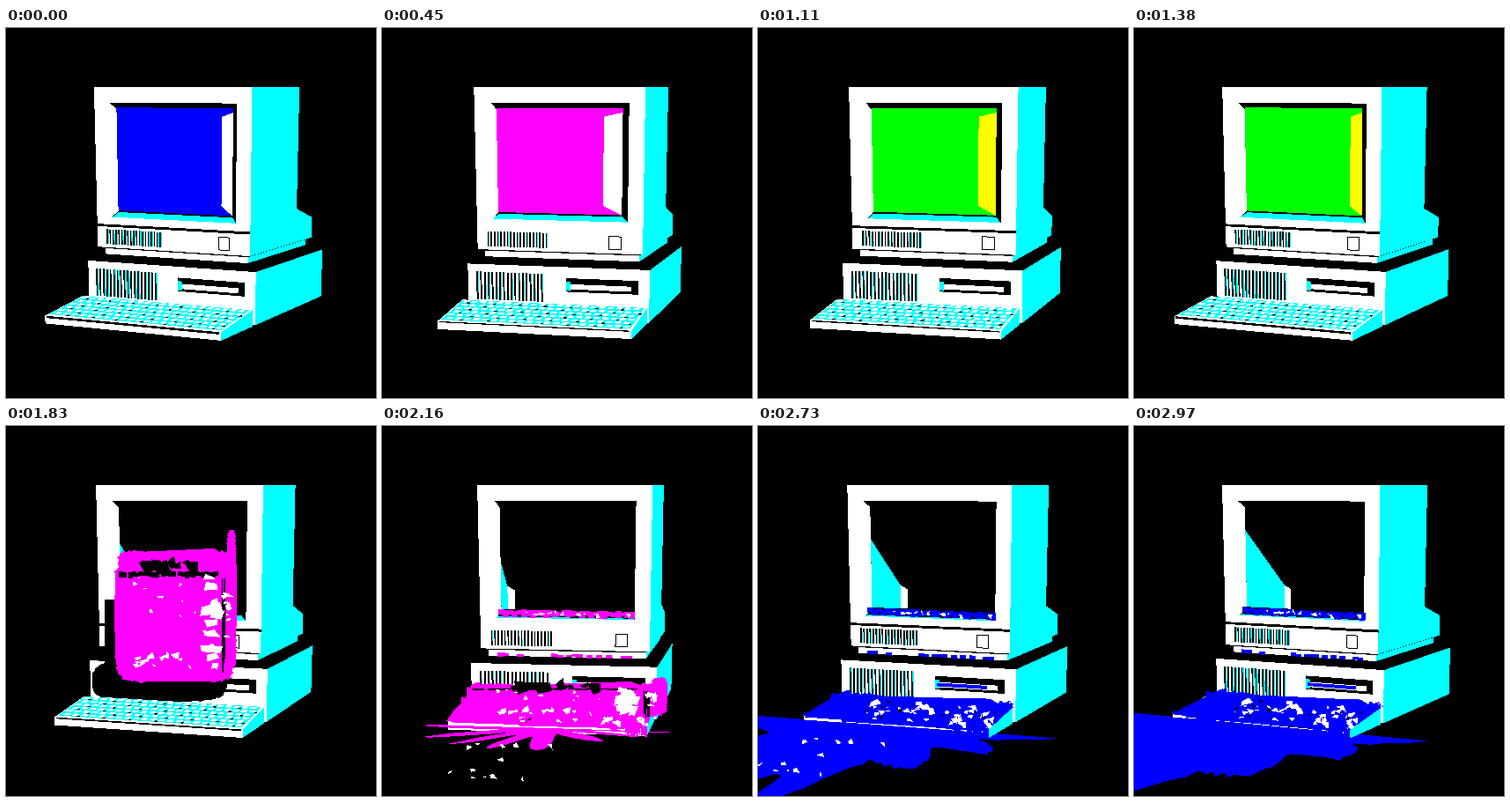
Recreate the animation shown at these times as an HTML page. Size 420 by 420 pixels, loop 3000 ms.

```html
<!DOCTYPE html>
<html lang="en">
<head>
<meta charset="utf-8">
<title>Melting monitor</title>
<style>
html, body { margin: 0; width: 100%; height: 100%; overflow: hidden; background: #000; }
svg { display: block; width: 100vw; height: 100vh; }
</style>
</head>
<body>
<svg id="stage" viewBox="0 0 420 420" shape-rendering="crispEdges"></svg>
<script>
const LOOP = 3000, STEP = 30, SWAY = 1500, MELT = 1500, SPLASH = 2070;
const WHITE = '#fff', CYAN = '#0ff', BLACK = '#000', BLUE = '#00f', MAGENTA = '#f0f', GREEN = '#0f0', YELLOW = '#ff0';
const TABLE = 274;
const stage = document.getElementById('stage');
let angle = 0;

const mix = (a, b, k) => a + (b - a) * k;
const clamp = k => Math.max(0, Math.min(1, k));
const rand = n => { const s = Math.sin(n * 127.1 + 11.7) * 43758.5453; return s - Math.floor(s); };
const times = (n, fn) => Array.from({ length: n }, (_, i) => fn(i));
const trace = pts => 'M' + pts.map(p => p[0].toFixed(1) + ' ' + p[1].toFixed(1)).join('L') + 'Z';
const paint = (fill, ...paths) => `<path fill="${fill}" d="${paths.join('')}"/>`;

// x runs along the front, y down from eye level, z away from the viewer.
function project([x, y, z]) {
  const c = Math.cos(angle), s = Math.sin(angle);
  const scale = 1476 / (1610 + z * c - x * s), drop = y * scale;
  return [220.5 + (x * c + z * s) * scale * (1 - drop / 4900), 67 + drop];
}
const solid = (...pts) => trace(pts.map(project));
const faceQuad = (x0, x1, y0, y1, z) => [[x0, y0, z], [x1, y0, z], [x1, y1, z], [x0, y1, z]].map(project);
const face = (...edges) => trace(faceQuad(...edges));
const sideWall = (x, outline) => solid(...outline.map(([z, y]) => [x, y, z]));

const box = (x0, x1, y0, y1, z0, z1) =>
  paint(CYAN, sideWall(x1, [[z0, y0], [z1, y0], [z1, y1], [z0, y1]])) + paint(WHITE, face(x0, x1, y0, y1, z0));

// Part of a screen quad, in fractions of its width and height.
const across = (q, u, v) => [0, 1].map(i => mix(mix(q[0][i], q[1][i], u), mix(q[3][i], q[2][i], u), v));
const cell = (q, u0, u1, v0, v1) => [[u0, v0], [u1, v0], [u1, v1], [u0, v1]].map(([u, v]) => across(q, u, v));

// Rounded lump filling a quad, with a ragged edge.
function lump(q, power, rough) {
  const bend = v => Math.sign(v) * Math.abs(v) ** power;
  return trace(times(90, i => {
    const a = i / 45 * Math.PI;
    const [x, y] = across(q, 0.5 + bend(Math.cos(a)) / 2, 0.5 + bend(Math.sin(a)) / 2);
    return [x + (rand(i) - 0.5) * rough, y + (rand(i + 300) - 0.5) * rough];
  }));
}

function shards(q, count, size, seed) {
  return times(count, i => {
    const n = seed + i, [x, y] = across(q, rand(n), rand(n + 90));
    const reach = size * (0.4 + rand(n + 180));
    return trace(times(4, j => {
      const a = j * 1.57 + rand(n + j) * 1.4, r = reach * (0.35 + rand(n * 3 + j));
      return [x + Math.cos(a) * r, y + Math.sin(a) * r * 0.7];
    }));
  }).join('');
}

// Broken strip of liquid left behind on an edge.
const dribble = (q, density, seed) => times(30, i => rand(seed + i) > density ? '' :
  trace(cell(q, i / 30, i / 30 + 0.045, rand(seed + i + 40) * 0.3, 0.7 + rand(seed + i + 80) * 0.4))).join('');

function vents(q, count, front) {
  const slit = (i, from, to) => trace(cell(q, (i + from) / count, (i + to) / count, 0, 1));
  return paint(CYAN, ...times(count, i => i % 3 === 1 ? '' : slit(i, 0.45, 0.8 - front * 0.3))) +
    paint(BLACK, ...times(count, i => slit(i, 0, 0.45)));
}

function desktopUnit(front) {
  return box(-120, 112, 212, 273, -80, 150) +
    vents(faceQuad(-109, -20, 221, 254, -80), 18, front) +
    paint(BLACK, face(7, 98, 225, 241, -80)) +
    paint(CYAN, face(7, 13, 229, 240, -80)) +
    paint(WHITE, face(13, 89, 232, 238, -80));
}

function monitor(front) {
  const Z = -75, back = 76, foot = 133, base = 195;
  const side = [[Z, 0], [back, 0], [back, 153], [foot, 169], [foot, base], [Z, base]];
  return box(-100, 97, 197, 204, -70, 125) +
    paint(CYAN, sideWall(102, side)) + paint(WHITE, face(-108, 102, 0, base, Z)) +
    (front < 0.6 ? paint(BLACK, face(-108, 102, 167, 170, Z)) : '') +
    vents(faceQuad(-95, -16, 173, 191, Z), 19, front) +
    `<path fill="none" stroke="#000" d="${face(60, 75, 175, 190, Z)}"/>` +
    paint(BLACK, face(-87, 83, 19, 158, Z)) +
    paint(WHITE, solid([-87, 19, Z], [-84, 27, -62], [-84, 151, -62], [-87, 158, Z])) +
    paint(CYAN, solid([-87, 158, Z], [-84, 153, -62], [73, 153, -62], [83, 158, Z]));
}

function glass(front, color) {
  const light = color === GREEN ? YELLOW : WHITE, near = -63, far = -25;
  return paint(color, face(-84, 73, 25, 151, near)) +
    paint(light, solid([73, 30, near], [73, 151, near], [41, 144, far], [41, 36, far])) +
    (front > 0.8 ? paint(light, solid([-75, 31, near], [73, 31, near], [41, 39, far], [-65, 39, far])) : '');
}

// The light on the inner wall slides down as the front comes round.
function cavity(front) {
  const far = 85;
  return paint(CYAN, solid([-84, 55 + 38 * front, -62], [-107, 133, far], [-107, 165, far], [-84, 151, -62])) +
    paint(WHITE, solid([-107, 133, far], [-97, 138, far], [-97, 165, far], [-107, 165, far]));
}

const keyBed = () => [[-125, 255, -86], [107, 255, -86], [107, 264, -169], [-125, 264, -169]].map(project);
const keySide = () => paint(CYAN, sideWall(110, [[-175, 265], [-84, 255], [-84, TABLE], [-175, TABLE]]));

function keyboard(front) {
  const rows = 6, cols = 21, bed = keyBed();
  const part = (r, c, u0, u1, v0, v1) => {
    const left = c + (r % 2) * 0.3, width = cols + 0.3;
    return trace(cell(bed, (left + u0) / width, (left + u1) / width, (r + v0) / rows, (r + v1) / rows));
  };
  const keys = fn => times(rows * cols, i => fn(Math.floor(i / cols), i % cols)).join('');
  return paint(WHITE, solid([-127, 255, -84], [110, 255, -84], [110, 265, -175], [-127, 265, -175])) +
    paint(CYAN, trace(bed)) +
    paint(WHITE, keys((r, c) => part(r, c, 0.15, 0.82, 0.1, 0.72))) +
    paint(BLACK, keys((r, c) => (r + c) % 3 ? '' : part(r, c, 0.8, 1.15, 0.65, 0.95))) +
    keySide() + paint(WHITE, face(-127, 110, 265, TABLE, -175)) +
    paint(BLACK, face(-125, 108, 265, 267.5 - 2 * front, -175));
}

// The mass falls under gravity, and flattens once its underside lands.
function massQuad(t) {
  const fall = ((t - MELT) / 330) ** 2;
  const floor = 151 + 73 * fall, bottom = Math.min(floor, 262);
  const half = 79 - 5 * clamp(fall) + (floor - bottom) * 0.25;
  const z = -63 - 47 * Math.min(fall, 1.3), mid = mix(-5, 5, clamp(fall));
  const [left, top] = project([mid - half, 25 + 51 * fall, z]);
  const [right, low] = project([mid + half, bottom, z]);
  return [[left, top], [right, top], [right, low], [left, low]];
}

function massShadow(q) {
  return paint(BLACK, lump(cell(q, -0.2, 0.94, 0.84, 1.15), 0.5, 2), trace(cell(q, -0.1, 0.1, 0.38, 1)));
}

function mass(q, t, color) {
  const melt = clamp((t - MELT) / 300);
  const body = paint(color, lump(q, mix(0.05, 0.22, melt), 5 * melt), lump(cell(q, 0.94, 1.02, -0.15, 0.9), 0.4, 2));
  if (melt < 0.5) return body;
  return body +
    paint(BLACK, shards(cell(q, 0.2, 0.8, 0.1, 0.14), 16, 9, 30), dribble(cell(q, 0.02, 0.86, 0.16, 0.21), 0.85, 12),
      dribble(cell(q, 0.9, 0.93, 0.2, 0.95), 1, 5)) +
    paint(WHITE, shards(cell(q, 0.78, 0.86, 0.2, 0.95), 16, 10, 70), shards(cell(q, 0.92, 1, 0.3, 0.7), 8, 6, 40),
      shards(cell(q, 0.1, 0.7, 0.2, 0.5), 9, 4, 20), shards(cell(q, 0.15, 0.65, 0.78, 0.9), 14, 5, 55));
}

// Half an ellipse on the table, with fingers that fill in as it spreads.
function puddle(t) {
  const reach = ((t - SPLASH) / 420) ** 0.55, depth = Math.min(0.6, 0.5 / reach ** 2), n = 160;
  return solid(...times(n + 1, i => {
    const a = i / n * Math.PI;
    const finger = 1 - depth * Math.sin(7 * a + Math.sin(3 * a)) ** 2 - rand(Math.floor(i / 2)) * 0.07;
    const lean = 1 - 0.3 * Math.max(0, Math.sin(2 * a));
    return [-13 + Math.cos(a) * (135 + 55 * reach) * finger * lean, TABLE, -148 - Math.sin(a) * 310 * reach * finger * lean];
  }));
}

function spill(t, color) {
  const bed = keyBed(), late = clamp((t - 2490) / 480);
  const pool = cell(bed, 0.25, 0.99, 0.1, 0.98);
  let out = paint(color, dribble(faceQuad(-95, 90, 200, 205, -70), 0.55, 4), face(10, 75, 233, 237, -80));
  if (t > 2250 && t < 2700) {
    const y = 180 + (t - 2490) * 0.16;
    out += paint(BLACK, lump(faceQuad(-18, 28, y + 25, y + 52, -100), 0.8, 4)) +
      paint(color, lump(faceQuad(23, 34, y + 5, y + 31, -100), 0.9, 3), lump(faceQuad(11, 24, y + 27, y + 48, -100), 0.8, 4)) +
      paint(WHITE, lump(faceQuad(26, 31, y + 9, y + 26, -100), 0.9, 1));
  }
  out += paint(color, puddle(t), lump(cell(bed, -0.02, 1.01, -0.25, 1.2), 0.2, 6));
  out += keySide() + paint(color, dribble(faceQuad(85, 112, 262, 275, -176), 0.7, 60));
  out += paint(WHITE, face(-127, mix(-42, -110, late), 266, 269, -175), shards(pool, 40, 5, 210)) +
    paint(BLACK, shards(pool, 16, 2.5, 330));
  const foam = [[-90, TABLE, -230], [10, TABLE, -230], [20, TABLE, -430], [-70, TABLE, -430]].map(project);
  return t < 2760 ? out + paint(WHITE, shards(foam, 12, 4, 420)) : out;
}

function liquidColor(t) {
  if (t < 330 || t >= 2190) return BLUE;
  return t >= 1080 && t < 1650 ? GREEN : MAGENTA;
}

function render(t) {
  const front = (1 - Math.cos(t * 2 * Math.PI / SWAY)) / 2;
  angle = mix(25.5, 8.2, front) * Math.PI / 180;
  const color = liquidColor(t), melting = t > MELT, falling = melting && t < 2190;
  const bulk = massQuad(t);
  let out = paint(BLACK, 'M0 0H420V420H0Z') + desktopUnit(front) + monitor(front);
  out += melting ? cavity(front) : glass(front, color);
  if (t > 1950) {
    const rim = faceQuad(-86, 81, 148, 157, -71);
    out += paint(BLACK, trace(rim)) + paint(color, dribble(rim, 1, 90)) +
      paint(WHITE, shards(cell(rim, 0.2, 0.97, 0.3, 0.7), 13, 3, 120));
  }
  if (falling && t > 1650) out += massShadow(bulk);
  out += keyboard(front);
  if (t > SPLASH) out += spill(t, color);
  if (falling) out += mass(bulk, t, color);
  stage.innerHTML = out;
}

const start = performance.now();
let shown = -1;
function tick() {
  const t = Math.floor((performance.now() - start) % LOOP / STEP) * STEP;
  if (t !== shown) render(shown = t);
  requestAnimationFrame(tick);
}
tick();
</script>
</body>
</html>
```
